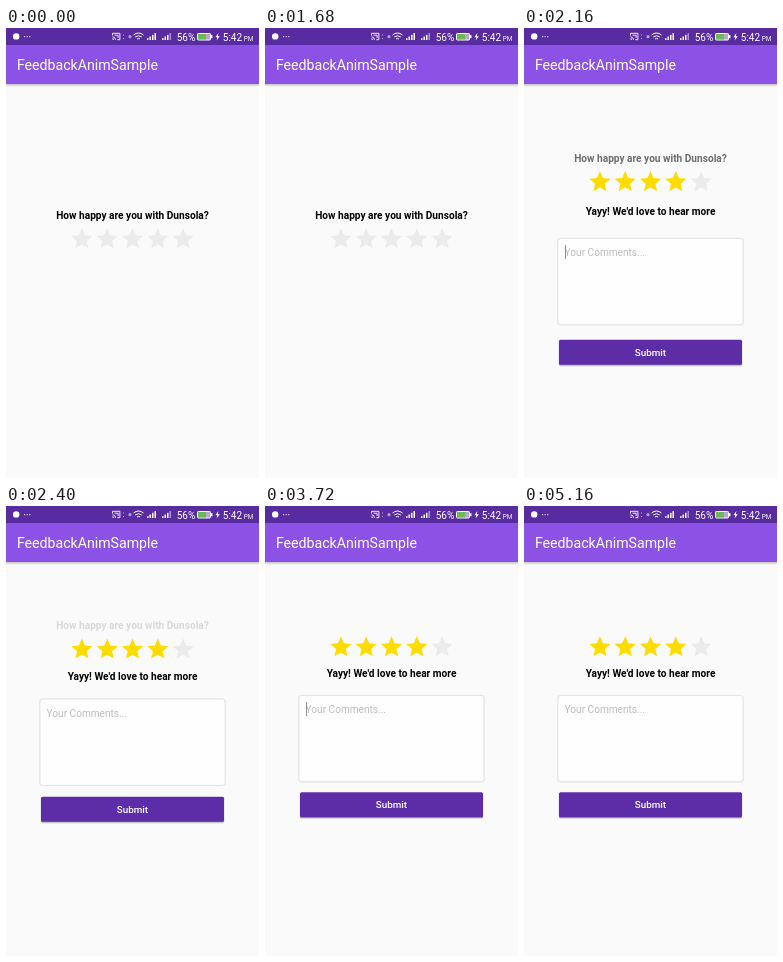
An HTML page for the animation above (5400 ms loop, 253x450 px).

```html
<!DOCTYPE html>
<html lang="en">
<head>
<meta charset="utf-8">
<title>Feedback form</title>
<style>
  html, body { margin: 0; width: 100%; height: 100%; overflow: hidden; background: #fafafa; }
  svg { display: block; width: 100vw; height: 100vh; font-family: Roboto, sans-serif; }
  .bold { font-size: 10.15px; font-weight: 700; text-anchor: middle; }
</style>
</head>
<body>
<svg viewBox="0 0 253 450">
  <defs>
    <linearGradient id="shade" x2="0" y2="1">
      <stop stop-color="#000" stop-opacity=".22"/>
      <stop offset="1" stop-color="#000" stop-opacity="0"/>
    </linearGradient>
    <clipPath id="panel"><path d="M0 60H253V386H0z"/></clipPath>
    <path id="star" d="M12 17.27 18.18 21l-1.64-7.03L22 9.24l-7.19-.61L12 2 9.19 8.63 2 9.24l5.46 4.73L5.82 21z"/>
  </defs>
  <rect width="253" height="450" fill="#fafafa"/>

  <!-- status bar -->
  <rect width="253" height="17" fill="#592ba0"/>
  <g fill="#fff">
    <circle cx="10.2" cy="8.4" r="3.2"/>
    <path d="M18 8h1.2v1.2H18zm2.6 0h1.2v1.2h-1.2zm2.6 0h1.2v1.2h-1.2z" opacity=".75"/>
    <path d="M117 6.5h1v1h-1zm0 3.5h1v1h-1z" opacity=".6"/>
    <circle cx="124" cy="8.7" r="1.6" opacity=".55"/>
    <path d="M106.5 11.8v-1.6q1.6 0 1.6 1.6z"/>
    <g fill="none" stroke="#fff">
      <path d="M106.5 7.5V5.3h7.4v6.4h-2.6M106.5 8.8q3 0 3 3M108.5 7.2h3.6v2.8" stroke-width=".9"/>
      <path d="M127.5 7q5-4 10 0M129.2 9q3.3-2.6 6.6 0M131 11q1.5-1.2 3 0" stroke-width="1"/>
    </g>
    <g id="bars"></g>
    <text x="170.7" y="12.6" font-size="10">56%</text>
    <rect x="191.5" y="5.5" width="13" height="6.5" rx=".8" fill="#b9a6d6" stroke="#fff"/>
    <rect x="192" y="6" width="8" height="5.5" fill="#69b957"/>
    <rect x="205" y="7.2" width="1.5" height="3"/>
    <path d="M212.4 5 209.4 9.2h2l-.8 3.4 3.2-4.4h-2z"/>
    <text x="216.8" y="12.6" font-size="10">5:42</text>
    <text x="237.8" y="12.6" font-size="6.4">PM</text>
  </g>

  <!-- app bar -->
  <rect y="17" width="253" height="39" fill="#8c52e5"/>
  <rect y="56" width="253" height="3" fill="url(#shade)"/>
  <text x="10.9" y="42" font-size="14.15" fill="#fff">FeedbackAnimSample</text>

  <!-- everything below is placed at its final position -->
  <text id="question" class="bold" x="126.5" y="120.9">How happy are you with Dunsola?</text>
  <g id="stars"></g>
  <g id="form" clip-path="url(#panel)">
    <text id="praise" class="bold" x="126.5" y="171">Yayy! We'd love to hear more</text>
    <g id="comments">
      <rect x="33" y="188.7" width="187" height="88" rx="3.5" fill="#efefef"/>
      <rect x="33.9" y="189.4" width="185.2" height="86.4" rx="2.8" fill="#fefefe" stroke="#e3e3e3"/>
      <text x="40.6" y="207.2" font-size="10.1" fill="#bdbdbd">Your Comments...</text>
      <rect id="caret" x="41" y="196" width="1" height="14" fill="#909090"/>
    </g>
    <g id="submit">
      <rect x="34.5" y="287" width="184" height="26" rx="2" opacity=".12"/>
      <rect x="35" y="287" width="183" height="25" rx="1.5" opacity=".25"/>
      <rect x="35" y="286.2" width="183" height="25" rx="1.5" fill="#5d2da8"/>
      <text x="126.5" y="302.2" font-size="9.84" font-weight="500" fill="#fff" text-anchor="middle">Submit</text>
    </g>
  </g>
</svg>
<script>
const LOOP = 5400, STEP = 120, OPEN = 1800, BLINK = 480;
const START = 1625, LENGTH = 1000;
const travel = { question: 70, stars: 70, praise: 85, comments: 114, submit: 139 };
const $ = id => document.getElementById(id);

$('stars').innerHTML = [0, 1, 2, 3, 4].map(i =>
  `<use href="#star" transform="translate(${63.2 + 25.3 * i} 128.1) scale(1.06)"/>`).join('');
const stars = [...$('stars').children];

$('bars').innerHTML = [141, 156].map(x => [0, 1, 2, 3].map(i =>
  `<rect x="${x + i * 2.5}" y="${10.2 - i * 1.7}" width="1.5" height="${1.8 + i * 1.7}"
    opacity="${x > 150 && i > 2 ? .5 : 1}"/>`).join('')).join('');

// cubic-bezier(.4, 0, .2, 1)
function ease(x) {
  let lo = 0, hi = 1;
  for (let i = 0; i < 24; i++) {
    const s = (lo + hi) / 2, u = 1 - s;
    if (1.2 * u * u * s + .6 * u * s * s + s ** 3 < x) lo = s; else hi = s;
  }
  return 3 * lo * lo - 2 * lo ** 3;
}
const clamp = v => Math.min(1, Math.max(0, v));

function draw(now) {
  const t = Math.floor(now % LOOP / STEP) * STEP;
  const open = t >= OPEN;
  const left = open ? 1 - ease(clamp((t - START) / LENGTH)) : 1;
  for (const id in travel)
    $(id).setAttribute('transform', `translate(0 ${(travel[id] * left).toFixed(2)})`);
  $('question').setAttribute('opacity', clamp((2472 - t) / 555));
  $('form').setAttribute('visibility', open ? 'visible' : 'hidden');
  $('caret').setAttribute('opacity', Math.floor((t - OPEN) / BLINK) % 2 ? 0 : 1);
  stars.forEach((s, i) => s.setAttribute('fill', open && i < 4 ? '#ffdc00' : '#ebebec'));
}

const begin = performance.now();
function tick() {
  draw(performance.now() - begin);
  requestAnimationFrame(tick);
}
tick();
</script>
</body>
</html>
```
